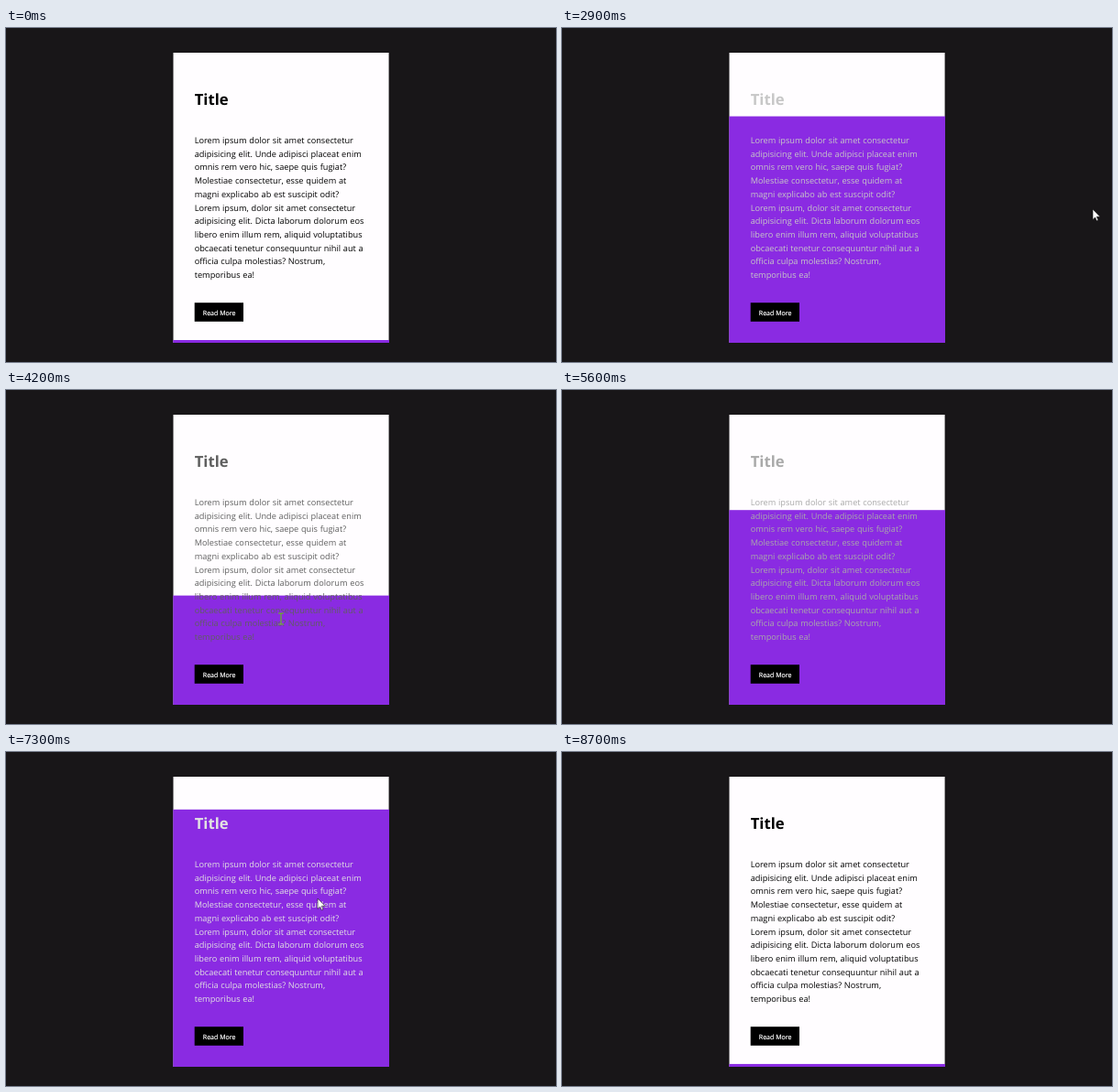
Animation of 600 by 365 pixels, one loop 8800 ms. Source, as an HTML page:

```html
<!DOCTYPE html>
<html lang="en">
<head>
<meta charset="utf-8">
<title>Hover card</title>
<style>
  html, body { margin: 0; width: 100%; height: 100%; overflow: hidden; background: #181618; }
  svg { display: block; }
  text { font-family: "Open Sans", "Noto Sans", sans-serif; text-rendering: geometricPrecision; }
  .title { font-size: 16.7px; font-weight: 700; }
  .body { font-size: 9.2px; word-spacing: .35px; }
  .label { font-size: 7.05px; fill: #fff; stroke: #fff; stroke-width: .2; }

  .fill { fill: #8a2be2; animation: rise 8.8s ease infinite; }
  .ink { animation: ink 8.8s ease infinite; }
  .arrow {
    fill: #fff; stroke: #111; stroke-width: .6;
    animation: move 8.8s linear infinite, arrow 8.8s step-end infinite;
  }
  .beam {
    fill: none; stroke: #eee; stroke-width: 1.1; mix-blend-mode: difference;
    animation: move 8.8s linear infinite, beam 8.8s step-end infinite;
  }

  /* Three hovers, each a one second ease in and out */
  @keyframes rise {
    0%, 15.716%, 42.432%, 45.09%, 72.557%, 76.136%, 99.091%, 100% { transform: translateY(314px); }
    27.08%, 31.068%, 56.454%, 61.193%, 87.5%, 87.727% { transform: translateY(0); }
  }
  @keyframes ink {
    0%, 15.716%, 42.432%, 45.09%, 72.557%, 76.136%, 99.091%, 100% { fill: #000; }
    27.08%, 31.068%, 56.454%, 61.193%, 87.5%, 87.727% { fill: #fff; }
  }

  @keyframes move {
    0%, 14.205% { transform: translate(322px, -20px); }
    14.773% { transform: translate(324px, 2px); }
    15.716% { transform: translate(326px, 28px); }
    18.182% { transform: translate(336px, 150px); }
    20.455% { transform: translate(339px, 184px); }
    29.545% { transform: translate(344px, 196px); }
    31.068% { transform: translate(418px, 199px); }
    32.955%, 33.523% { transform: translate(579px, 198px); }
    44.886% { transform: translate(300px, 318px); }
    47.727%, 61.193% { transform: translate(300px, 250px); }
    74.432% { transform: translate(530px, 174px); }
    75% { transform: translate(517px, 172px); }
    76.136% { transform: translate(418px, 168px); }
    78.41% { transform: translate(345px, 162px); }
    82.955% { transform: translate(340px, 160px); }
    86.364% { transform: translate(344px, 162px); }
    87.727% { transform: translate(418px, 168px); }
    88.636%, 100% { transform: translate(436px, 170px); }
  }
  @keyframes arrow {
    0%, 17.045%, 33.523%, 89.205%, 100% { opacity: 0; }
    14.545%, 30.568%, 74.432% { opacity: 1; }
  }
  @keyframes beam {
    0%, 30.568%, 61.193%, 100% { opacity: 0; }
    17.045%, 45% { opacity: 1; }
  }
</style>
</head>
<body>
<svg width="100%" height="100%" viewBox="0 0 600 365">
  <rect width="600" height="365" fill="#181618"/>
  <svg x="182.3" y="27" width="235.3" height="317" overflow="hidden">
    <rect width="236" height="317" fill="#fffdff"/>
    <rect class="fill" width="236" height="317"/>
  </svg>
  <g class="ink">
    <text class="title" x="205.7" y="84">Title</text>
    <text class="body" y="126">
      <tspan x="205.7">Lorem ipsum dolor sit amet consectetur</tspan>
      <tspan x="205.7" dy="14.72">adipisicing elit. Unde adipisci placeat enim</tspan>
      <tspan x="205.7" dy="14.72">omnis rem vero hic, saepe quis fugiat?</tspan>
      <tspan x="205.7" dy="14.72">Molestiae consectetur, esse quidem at</tspan>
      <tspan x="205.7" dy="14.72">magni explicabo ab est suscipit odit?</tspan>
      <tspan x="205.7" dy="14.72">Lorem ipsum, dolor sit amet consectetur</tspan>
      <tspan x="205.7" dy="14.72">adipisicing elit. Dicta laborum dolorum eos</tspan>
      <tspan x="205.7" dy="14.72">libero enim illum rem, aliquid voluptatibus</tspan>
      <tspan x="205.7" dy="14.72">obcaecati tenetur consequuntur nihil aut a</tspan>
      <tspan x="205.7" dy="14.72">officia culpa molestias? Nostrum,</tspan>
      <tspan x="205.7" dy="14.72">temporibus ea!</tspan>
    </text>
  </g>
  <rect x="205.7" y="300.2" width="53.3" height="20.6"/>
  <text class="label" x="214.8" y="313.6">Read More</text>
  <path class="beam" d="M-3 -6H-.8L0 -5.3L.8 -6H3M0 -5.3V5.3M-3 6H-.8L0 5.3L.8 6H3"/>
  <path class="arrow" d="M0 0V11.4L2.6 9L4.3 12.8L6 12L4.3 8.3H8Z"/>
</svg>
</body>
</html>
```
